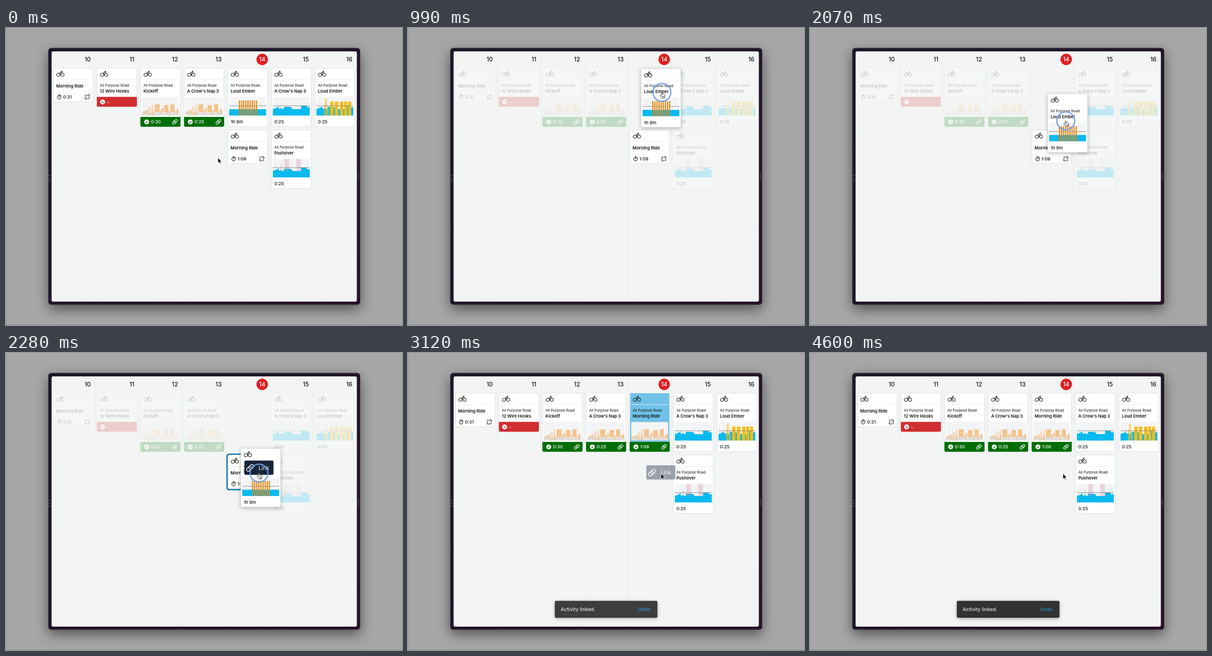
Animation of 864x648 px, one loop 4.8 s. Source, as an HTML page:

```html
<!DOCTYPE html>
<html lang="en">
<head>
<meta charset="utf-8">
<title>Calendar linking</title>
<style>
  html, body { margin: 0; width: 100%; height: 100%; overflow: hidden; background: #a7a7a7; }
  svg { display: block; width: 100vw; height: 100vh; }
  text { font-family: Inter, Roboto, sans-serif; fill: #111; white-space: pre; }
  .day { font-size: 12.8px; font-weight: 500; text-anchor: end; }
  .plan { font-size: 7.9px; }
  .title { font-size: 9.25px; font-weight: 600; }
  .time { font-size: 9.6px; font-weight: 500; }
  .icon { fill: none; stroke: #111; stroke-width: 1.1; stroke-linecap: round; stroke-linejoin: round; }
  .white { fill: #fff; }
  .icon.inv { stroke: #fff; }
  .window { filter: drop-shadow(0 10px 14px rgba(0,0,0,.5)); }
  .lift { filter: drop-shadow(0 2px 4px rgba(0,0,0,.28)); }
</style>
</head>
<body>
<svg id="stage" viewBox="0 0 864 648"></svg>
<script>
const LOOP = 4800, COL = 95.15, TOP = 87, ROW2 = 222;
const colX = i => 103 + COL * i;

// Markup helpers
const rect = (x, y, w, h, fill, rest = '') =>
  `<rect x="${x}" y="${y}" width="${w}" height="${h}" fill="${fill}" ${rest}/>`;
const text = (x, y, cls, s) => `<text x="${x}" y="${y}" class="${cls}">${s}</text>`;
const at = (x, y, body, rest = '') => `<g transform="translate(${x} ${y})" ${rest}>${body}</g>`;
const path = (d, rest = '') => `<path d="${d}" ${rest}/>`;
const bars = (list, fill) => list.map(([x, w, y, h = 40.5 - y]) => rect(x, y, w, h, fill)).join('');

// Icons, each centred on 0,0
const bike = `<g class="icon" stroke-width="1.3"><circle cx="-4.5" cy="2" r="3.5"/><circle cx="4.6" cy="2" r="3.5"/>
  ${path('M.6 3.4V.6L-1.6-1.8 1.6-4 3.4-1.6H5.4')}<circle cx="3" cy="-5.2" r=".8" fill="#111"/></g>`;
const timer = `<g class="icon"><circle cy=".7" r="3.9"/>${path('M-1.3-5H1.3M0-1.3V1M3.2-3.6l.7.7')}</g>`;
const link = inv => `<g class="icon ${inv ? 'inv' : ''}" transform="rotate(-42)">
  <rect x="-6.3" y="-2.6" width="8" height="5.2" rx="2.6"/><rect x="-1.7" y="-2.6" width="8" height="5.2" rx="2.6"/></g>`;
const unlink = `<g class="icon" transform="rotate(-45)">
  ${path('M-1.6-2.4H-3.4a2.4 2.4 0 0 0 0 4.8H-1.6M1.6-2.4H3.4a2.4 2.4 0 0 1 0 4.8H1.6')}
  ${path('M-.9-4.4l-.4-1.4M.9-4.4l.4-1.4M-.9 4.4l-.4 1.4M.9 4.4l.4 1.4')}</g>`;
const check = `<circle r="5.4" fill="#fff"/>${path('M-2.4.1L-.7 1.9 2.5-1.7', 'fill="none" stroke="#006e06" stroke-width="1.3"')}`;
const skip = `<circle r="5.4" fill="#fff"/>${path('M-2.4-2.4L2.4 2.4', 'stroke="#d02e30" stroke-width="1.4"')}`;

// Workout charts, 80.5 x 40.5
const BLUE = '#09baee';
const threshold = path('M0 19.2H80.5', 'stroke="#777" stroke-width=".9"');
const terrain = path('M0 40.5V26.5L4 24V26L8 22.5V24L12.5 20V25.5H16V24.5H19V26H24V21.5H38.5V23H42V26.5H61.5V19H74V22.5H80.5V40.5Z', `fill="${BLUE}"`);
const charts = {
  past: path('M0 40.5V34L5 31V33H10V30H14V34H20V32H27V34L40 31 48 35 58 31 66 35 73 31H80.5V40.5Z', 'fill="#dfe0df"') +
    bars([[0, 1, 32], [3, 4, 31, 4], [8, 3, 29, 6], [12, 1, 26], [15, 1.4, 20], [18, 1.4, 23], [22, 1.6, 17], [24, 1, 27],
      [27.5, 11, 16, 17], [40, 2, 28, 8], [43, 3.5, 24, 9], [48, 9.5, 17.5, 16], [59, 1.5, 27],
      [62, 9, 16, 17], [73, 2, 29, 6], [76, 3.5, 26, 10], [69, 1, 22]], '#f2c48e'),
  sprints: rect(0, 26.7, 80.5, 13.8, BLUE) + threshold +
    bars(Array.from({ length: 9 }, (_, i) => [21.2 + 4.6 * i, 2.4, 7.5]), '#e5860f'),
  steady: terrain + threshold,
  blocks: terrain + bars([[17, 1, 16], [19, 1.6, 4], [22, 1, 3], [24, 2, 24], [30, 7, 10], [40, 7.5, 10],
    [51.5, 7, 10], [60.5, 6.5, 10], [69, 6.5, 10]], '#fbbd12') + threshold,
  attacks: terrain + bars([18, 26, 28.5, 31, 33.5, 52, 54.5, 57, 59.5].map((x, i) => [x, .8, i ? 0 : 12, i ? 27 : 14]), '#d391b4') + threshold,
};

// Cards
const shell = h => rect(.5, .5, 86.5, h - .5, '#fff', 'rx="3" stroke="#dcdfe1"');
const head = at(15.7, 13, bike) + path('M1 25.5H86.5', 'stroke="#eceeef"');
const footer = (y, h, fill) => path(`M0 ${y}H87.5V${y + h - 3}a3 3 0 0 1-3 3H3a3 3 0 0 1-3-3Z`, `fill="${fill}"`);
const names = title => text(6.7, 41, 'plan', 'All Purpose Road') + text(6.7, 54, 'title', title);
const chart = kind => at(3.5, 63.5, rect(0, 0, 80.5, 40.5, '#f3f4f5', 'rx="3"') + charts[kind]);

const ride = time => shell(74) + head + text(6.5, 43, 'title', 'Morning Ride') +
  at(13, 63.3, timer) + text(21.5, 67, 'time', time) + at(74.5, 63.5, unlink);
const planned = (title, kind, time) => shell(128) + head + names(title) + chart(kind) + text(6.7, 121.3, 'time', time);
const doneBody = (title, time) => head + names(title) + chart('past') + footer(107, 21.5, '#006e06') +
  at(13.7, 117.8, check) + text(23, 121.3, 'time white', time) + at(75, 117.8, link(true));
const done = (title, time) => shell(128) + doneBody(title, time);
const missed = title => shell(84) + head + names(title) + footer(63.3, 21.5, '#d02e30') +
  at(12.7, 74.2, skip) + text(22, 77.5, 'time white', '–');

const days = [10, 11, 12, 13, 14, 15, 16].map((d, i) => i === 4
  ? `<circle cx="559" cy="68.5" r="12.5" fill="#dd2022"/><text x="559" y="73.2" class="day white" style="text-anchor:middle">${d}</text>`
  : text(185 + COL * i, 73.2, 'day', d)).join('');
const lines = [1, 2, 3, 4, 5, 6].map(i => rect(99 + COL * i, 51, 1, 546, '#e7ebea')).join('');
const grip = [322, 328, 334].map(y => [94, 97].map(x => `<circle cx="${x}" cy="${y}" r="1" fill="#5c5766"/>`).join('')).join('');

const stage = document.getElementById('stage');
stage.innerHTML = `
  <defs><linearGradient id="bezel" x2="1" y2="1"><stop stop-color="#191a2a"/><stop offset="1" stop-color="#2a1229"/></linearGradient></defs>
  ${rect(0, 0, 864, 648, '#a7a7a7')}${rect(0, 0, 1, 648, '#969696')}${rect(0, 647, 864, 1, '#8e8e8e')}
  ${rect(92, 43.5, 681, 560.5, 'url(#bezel)', 'rx="7" class="window"')}
  ${rect(92.5, 44, 680, 559.5, 'none', 'rx="6.5" stroke="#47424f" stroke-width=".8"')}
  ${rect(99.5, 51, 666, 546, '#f2f5f4', 'rx="3.5"')}
  ${grip}${rect(768.5, 316, 1, 17, '#6b6270')}
  ${lines}${days}
  <g id="others">
    ${at(colX(0), TOP, ride('0:31'))}
    ${at(colX(1), TOP, missed('12 Wire Hooks'))}
    ${at(colX(2), TOP, done('Kickoff', '0:30'))}
    ${at(colX(3), TOP, done('A Crow\'s Nap 3', '0:25'))}
    ${at(colX(5), TOP, planned('A Crow\'s Nap 3', 'steady', '0:25'))}
    ${at(colX(5), ROW2, planned('Pushover', 'attacks', '0:25'))}
    ${at(colX(6), TOP, planned('Loud Ember', 'blocks', '0:25'))}
  </g>
  <g id="drop">${at(colX(4), ROW2, `<rect id="ring" x="-1.2" y="-1" width="90" height="77" rx="4" fill="none" stroke="#0b73b4" stroke-width="3"/>` + ride('1:09'))}</g>
  <g id="linked">${at(colX(4), TOP, `<rect id="flash" x=".5" y=".5" width="86.5" height="127.5" rx="3" stroke="#dcdfe1"/><g id="linkedBody">${doneBody('Morning Ride', '1:09')}</g>`)}</g>
  <g id="toast">
    ${rect(-112, -18.5, 224, 37, '#323232', 'rx="3" class="lift"')}
    <text x="-99" y="4" font-size="10.9" style="fill:#fff">Activity linked.</text>
    <text x="69" y="4" font-size="10.9" style="fill:#1ba3df">Undo</text>
  </g>
  <g id="drag">${planned('Loud Ember', 'sprints', '1h 9m')}</g>
  <g id="tip">${rect(-31.7, -15.5, 63.5, 31, '#172439', 'rx="3"')}${at(-13.3, .3, link(true), 'style="scale:1.45"')}
    <text x="-.8" y="4.6" font-size="12" class="white">Link</text></g>
  <circle id="touch" fill="none" stroke="#6d9ce6"/>
  <g id="pointer">
    ${path('M0 0V11.5L2.7 9 4.5 13 6.3 12.2 4.6 8.3H8.2Z', 'id="arrow" fill="#000" stroke="#fff" stroke-width=".8"')}
    ${path('M-1.2 1.2a1.1 1.1 0 0 1 2.2 0V4.6l.3-.6a1.1 1.1 0 0 1 1.9.5 1 1 0 0 1 1.8.5 1 1 0 0 1 1.6.8V8.5L5.5 10.5V12.7H-.3L-.8 11-4 7.6a1 1 0 0 1 1.3-1.5L-1.2 7.2ZM1.5 8v2.6M3 8v2.6M4.5 8v2.6', 'id="hand" fill="#fff" stroke="#222" stroke-width=".9" stroke-linejoin="round"')}
  </g>`;

const ui = Object.fromEntries([...stage.querySelectorAll('[id]')].map(n => [n.id, n]));
const PRESS = 570, HIT = 2125, DROP = 2910;

// Timing helpers
const ramp = (t, a, b) => Math.min(1, Math.max(0, (t - a) / (b - a)));
const smooth = u => u * u * (3 - 2 * u);
const mix = (a, b, u) => a + (b - a) * u;
// Standard curve, cubic-bezier(.4, 0, .2, 1)
const standard = u => {
  let lo = 0, hi = 1, s = .5;
  for (let i = 0; i < 18; i++) {
    s = (lo + hi) / 2;
    const x = 1.2 * s * (1 - s) ** 2 + .6 * s * s * (1 - s) + s ** 3;
    if (x < u) lo = s; else hi = s;
  }
  return s * s * (3 - 2 * s);
};

const moves = [[30, 540, 524, 138.7], [675, 1145, 564, 141], [1830, 2310, 552, 263.3]];
const pointerAt = t => moves.reduce(([x, y], [a, b, tx, ty]) => {
  const u = smooth(ramp(t, a, b));
  return [mix(x, tx, u), mix(y, ty, u)];
}, [462.5, 283.3]);

const show = (node, on) => node.setAttribute('visibility', on ? 'visible' : 'hidden');
const place = (node, x, y, sx = 1, sy = sx) => node.setAttribute('transform', `translate(${x} ${y}) scale(${sx} ${sy})`);
const fade = (node, a) => node.setAttribute('opacity', a);

function draw(t) {
  const [px, py] = pointerAt(t);
  const held = t >= PRESS && t < DROP, dropped = t >= DROP;

  fade(ui.others, dropped ? mix(.2, 1, ramp(t, 2955, 3120)) : mix(1, .2, ramp(t, PRESS, 770)));
  show(ui.drop, !dropped);
  show(ui.ring, held && t >= HIT);

  // The held card trails the pointer
  const [cx, cy] = pointerAt(t - (t < 1500 ? 45 : 20));
  show(ui.drag, !dropped);
  place(ui.drag, colX(4) + (held ? cx - 524 : 0), TOP + (held ? cy - 138.7 : 0));
  ui.drag.setAttribute('class', held ? 'lift' : '');

  show(ui.linked, dropped);
  const glow = ramp(t, DROP, 3430);
  ui.flash.setAttribute('fill', `rgb(${[14, 150, 215].map(c => Math.round(mix(c, 255, glow)))})`);
  fade(ui.linkedBody, mix(.2, 1, ramp(t, DROP, 3120)));

  const out = ramp(t, 2985, 3210), pop = smooth(ramp(t, HIT, HIT + 120));
  show(ui.tip, t >= HIT && out < 1);
  fade(ui.tip, pop * (1 - out));
  place(ui.tip, px - .3, py - 11.8 + 15 * out, mix(.8, 1, pop));

  const grow = ramp(t, 2963, 3113);
  const g = standard(grow);
  show(ui.toast, t >= 2963);
  fade(ui.toast, standard(ramp(t, 2963, 3188)));
  place(ui.toast, 432.3, 559.3, mix(.75, 1, g), mix(.5625, 1, g));

  const press = smooth(ramp(t, PRESS, 690)), release = ramp(t, DROP, 3090);
  show(ui.touch, t >= PRESS && release < 1);
  place(ui.touch, px, py);
  ui.touch.setAttribute('r', mix(26, 19.5, press) + 7 * release);
  ui.touch.setAttribute('stroke-width', mix(mix(1, 2.8, press), 1, Math.min(1, release * 2)));
  fade(ui.touch, press * .9 * (1 - release ** 3));

  // Hand over cards, arrow elsewhere
  const inCard = px > 484 && px < 571 && ((py > TOP && py < 215) || (py > ROW2 && py < 296));
  const hand = !dropped && (held || inCard);
  show(ui.hand, hand);
  show(ui.arrow, !hand);
  place(ui.pointer, px, py);
}

const start = performance.now();
function frame() {
  draw((performance.now() - start) % LOOP);
  requestAnimationFrame(frame);
}
frame();
</script>
</body>
</html>
```
